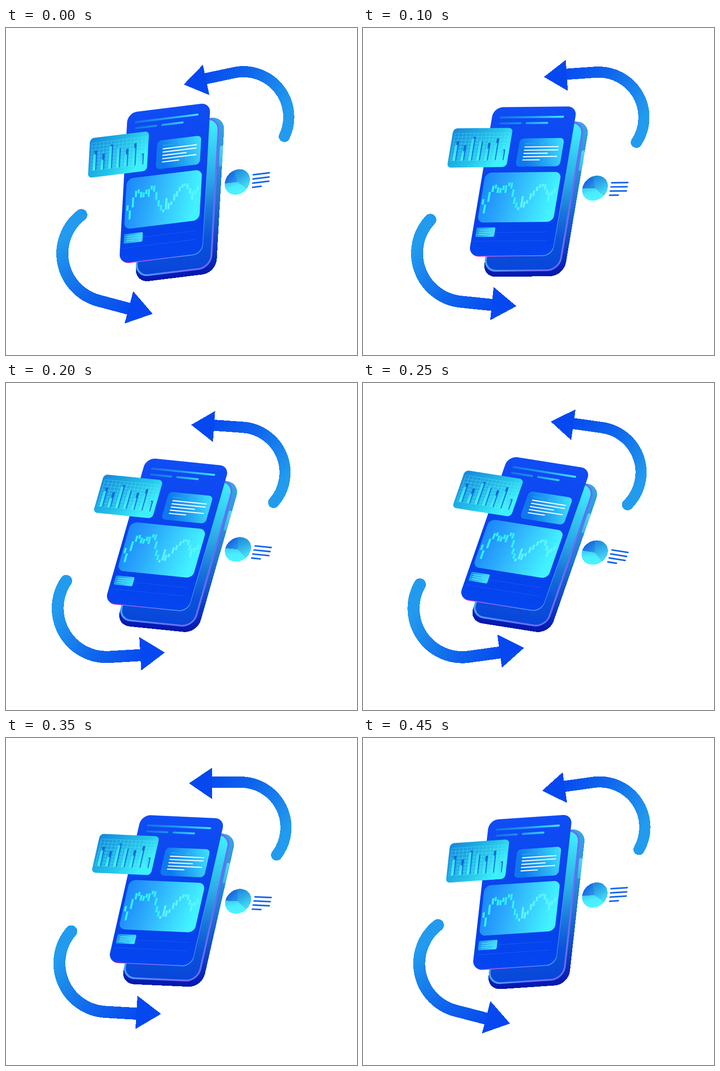
Animation, 775 px wide and 722 px high, one loop 500 ms. Source, as an HTML page:

```html
<!DOCTYPE html>
<html lang="en">
<head>
<meta charset="utf-8">
<title>Phone dashboard</title>
<style>
html, body { margin: 0; width: 100%; height: 100%; overflow: hidden; background: #fff; }
svg { display: block; width: 775px; height: 722px; }
</style>
</head>
<body>
<svg id="stage" viewBox="0 0 775 722" xmlns="http://www.w3.org/2000/svg">
  <defs id="defs">
    <linearGradient id="arrowFill" gradientUnits="userSpaceOnUse" x1="440" y1="90" x2="612" y2="215">
      <stop offset="0" stop-color="#0548f0"/><stop offset=".45" stop-color="#0f66ec"/><stop offset="1" stop-color="#229bee"/>
    </linearGradient>
    <g id="arrow" shape-rendering="crispEdges">
      <path d="M452 97.5H518A100 100 0 0 1 597.5 258.3" fill="none" stroke="url(#arrowFill)" stroke-width="24.6"/>
      <circle cx="597.5" cy="258.3" r="12.3" fill="#229bee"/>
      <path d="M404 100L454.5 66V134.5Z" fill="#0548f0"/>
    </g>
  </defs>
  <g id="top"><use href="#arrow"/></g>
  <g id="bottom"><use href="#arrow" transform="translate(345 605) rotate(181.3) scale(1.077) translate(-404 -100)"/></g>
  <g id="phone"><g id="art" transform="matrix(.999 .045 -.2216 .975 299.6 169.7)"></g></g>
</svg>
<script>
const NS = 'http://www.w3.org/2000/svg';
const CRISP = { 'shape-rendering': 'crispEdges' };
const $ = id => document.getElementById(id);
const art = $('art');

function add(tag, attrs, parent = art) {
  const el = document.createElementNS(NS, tag);
  for (const k in attrs) el.setAttribute(k, attrs[k]);
  parent.appendChild(el);
  return el;
}

let count = 0;
// Gradient along (x, y) in box units, colours spaced evenly.
function grad(x, y, ...colors) {
  const id = 'g' + count++;
  const g = add('linearGradient', { id, x1: 0, y1: 0, x2: x, y2: y }, $('defs'));
  colors.forEach((c, i) => add('stop', { offset: i / (colors.length - 1), 'stop-color': c }, g));
  return `url(#${id})`;
}

function box(x, y, x2, y2, r, fill, more) {
  return add('rect', { x, y, width: x2 - x, height: y2 - y, rx: r, fill, ...more });
}

function bar(x, x2, y, w, fill) {
  box(x, y - w / 2, x2, y + w / 2, w / 2, fill);
}

function drawBody() {
  box(37.5, 34, 217.5, 380.5, 30, grad(0, 1, '#38a8e2', '#2c92dc', '#2276d6', '#124cc8', '#0316ae'), CRISP);
  box(210.5, 99, 217.5, 145, 3.5, grad(0, 1, '#5fd2f4', '#3fb2ea'));
  box(39, 36, 205, 367, 27, grad(0, 1, '#40f2ff', '#36cef2', '#2aa8e8', '#1a78da', '#0b52da', '#0846da'), {
    stroke: grad(1, 0, '#4aa0ff', '#5684ff', '#6a6ef8', '#6a6cf8'), 'stroke-width': 4
  });
}

function drawPanel() {
  box(1.5, 150, 184.8, 335, 21, grad(1, 0, '#ff1fa8', '#c55cf0', '#8a74ff', '#6a8cff', '#58a4ff'));
  box(-.6, 0, 183.8, 333.3, 21, grad(0, 1, '#104df5', '#0c46ee', '#0540ea', '#0446f0'));
  bar(16.5, 158.6, 23, 4.4, grad(1, 0, '#1272e4', '#1fa0ec', '#40e4fc'));
  bar(18, 67, 36.4, 4.4, grad(1, 0, '#1270e4', '#1a94e6'));
  bar(76, 126, 36.4, 4.4, grad(1, 0, '#1f9cec', '#38cdf4'));
  box(52, 280.5, 167, 281.3, 0, '#1c62f2');
  box(5, 300, 167, 300.8, 0, '#1c62f2');
}

function drawNote() {
  box(69.5, 70.5, 167.5, 134, 9, grad(1, -.25, '#0f78ee', '#28b0f4', '#42ecff'));
  bar(82, 107, 82.4, 2.2, '#1fa9e6');
  bar(117, 124, 82.4, 2.2, '#2cbcee');
  [158.5, 158.5, 136.5, 158.5, 121].forEach((end, i) => bar(82.3, end, 89.8 + i * 7.3, 2.4, '#f4fdff'));
}

function drawCandles() {
  box(6, 146.5, 173.5, 258.5, 14, grad(1, .12, '#1a86fb', '#2aa6fb', '#38ccff', '#42f2ff'));
  const mid = [212, 228, 201, 183, 178, 186, 187, 181, 184, 173, 176, 193, 210, 220,
    228, 213, 219, 213, 201, 194, 184, 178, 176, 180, 191, 202, 195, 188];
  const tall = [12, 20, 22, 14, 9, 13, 11, 10, 17, 8, 13, 17, 14, 12,
    6, 25, 14, 8, 14, 12, 10, 8, 6, 12, 12, 19, 10, 10];
  mid.forEach((y, i) => {
    const x = 8.9 + i * 5.74, h = tall[i] / 2;
    box(x, y - h, x + 4.5, y + h, 0, i < 14 ? '#30f2ff' : '#5cf6ff');
  });
  box(7, 269.5, 48.5, 290.5, 3, grad(1, .2, '#178ee8', '#28b4f2', '#40e2ff'));
  [41, 41, 30].forEach((end, i) => bar(13, end, 275.3 + i * 4.8, 1.7, '#62dcf8'));
}

function drawBars() {
  box(-81.5, 46.5, 49.8, 134.3, 9, grad(1, .5, '#1488dc', '#1ba6e2', '#26c6ea', '#3cf0fc'));
  let d = '';
  for (let i = 0; i <= 14; i++) d += `M${-76 + i * 8.57} 58V119`;
  for (let i = 0; i <= 8; i++) d += `M-76 ${58 + i * 7.62}H44`;
  add('path', { d, fill: 'none', stroke: '#7ceefa', 'stroke-width': .8, opacity: .5 });
  const front = [83.4, 97.6, 69.7, 76, 92, 80, 97];
  const back = [75.5, 84.8, 66, 77, 80, 70, 95];
  const light = grad(0, 1, '#34d8f6', '#46f0ff');
  const dark = grad(0, 1, '#0a60dc', '#1480dc');
  front.forEach((y, i) => {
    const x = -72 + i * 17.5;
    box(x + 3, back[i], x + 8, 119, 0, dark);
    box(x, y, x + 5.7, 119, 0, light);
  });
}

function drawPie() {
  const cx = 253.9, cy = 184, r = 28;
  const at = a => [cx + r * Math.cos(a * Math.PI / 180), cy + r * Math.sin(a * Math.PI / 180)];
  const slice = (a, b, fill) =>
    add('path', { d: `M${cx} ${cy}L${at(a)}A${r} ${r} 0 0 1 ${at(b)}Z`, fill, ...CRISP });
  slice(180, 253, grad(1, .7, '#0a56e2', '#2a92e6'));
  slice(253, 398.5, grad(.5, 1, '#1b84de', '#2faae8', '#44d8f6'));
  slice(38.5, 180, grad(.5, 1, '#3cc8f4', '#4cecff', '#48f6ff'));
  [326, 326, 326, 309.5].forEach((end, i) => bar(287, end, 172.3 + i * 9.3, 3.5, '#1666ec'));
}

[drawBody, drawPanel, drawNote, drawCandles, drawBars, drawPie].forEach(f => f());

const STEP = 50, FRAMES = 10, TURN = 5;

function turn(id, angle, x, y) {
  $(id).setAttribute('transform', `rotate(${angle} ${x} ${y})`);
}

function draw(ms) {
  const k = Math.floor(ms / STEP) % FRAMES;
  const swing = TURN - Math.abs(k - TURN);
  turn('top', -12 + 4 * swing, 516.3, 167.5);
  turn('phone', -9.6 + 3.2 * swing, 389, 360);
  // The lower arrow swings back faster than it goes out.
  turn('bottom', k <= TURN ? 13.6 - 4.56 * k : -9.2 + 5.6 * (k - TURN), 225, 529.5);
}

function loop(now) {
  draw(now);
  requestAnimationFrame(loop);
}
draw(0);
requestAnimationFrame(loop);
</script>
</body>
</html>
```
